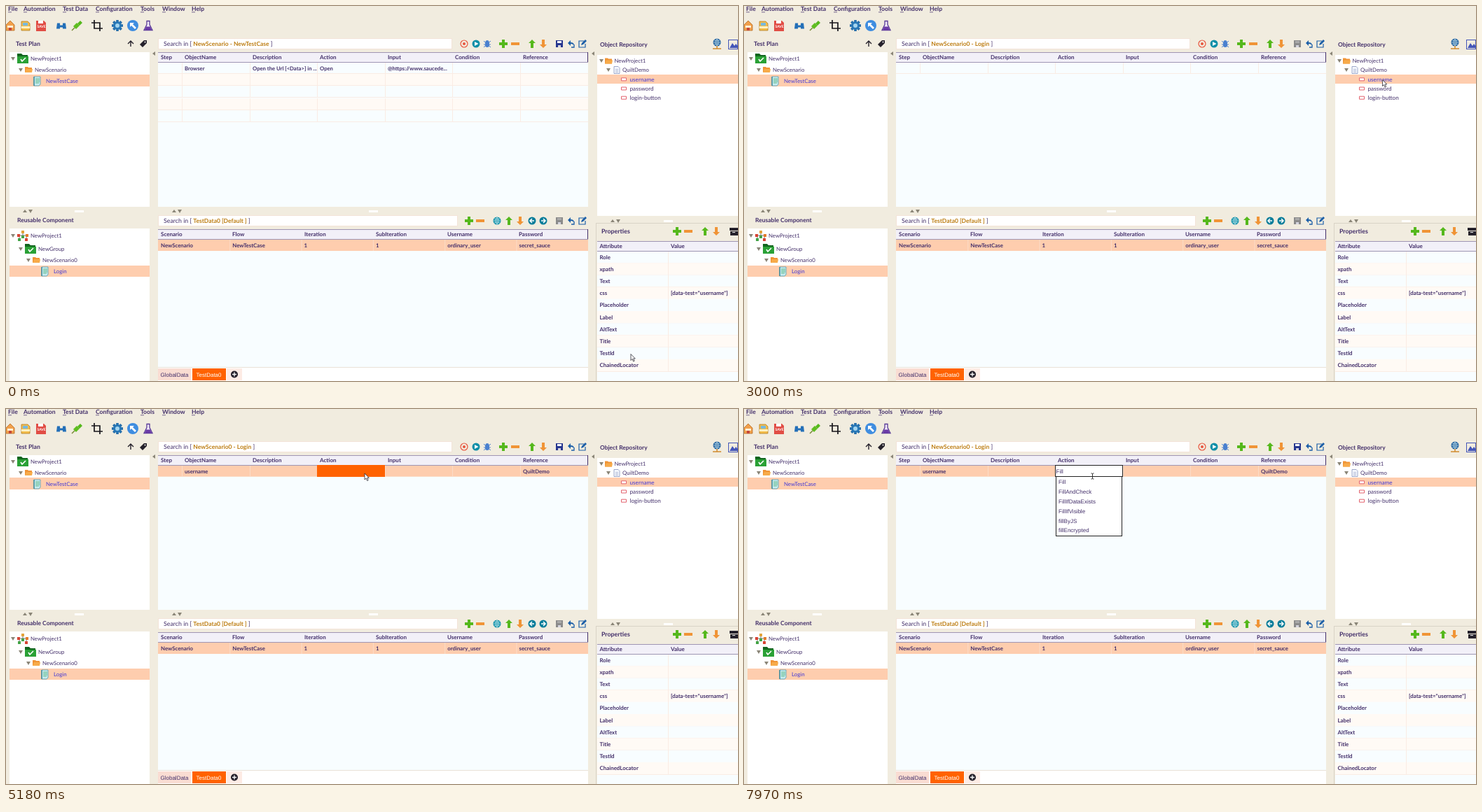
Recreate the animation shown at these times as an HTML page with a canvas. Size 1045 px wide and 536 px high, loop 8000 ms.

```html
<!DOCTYPE html>
<html lang="en">
<head>
<meta charset="utf-8">
<title>Test designer</title>
<style>
html, body { margin: 0; width: 100%; height: 100%; overflow: hidden; background: #f1ecdf; }
canvas { display: block; }
</style>
</head>
<body>
<canvas id="stage" width="1045" height="536"></canvas>
<script>
const c = document.getElementById('stage').getContext('2d');
const LOOP = 8000, INK = '#432f6a', LINK = '#4038d6', SEL = '#fecdae', SEL_GRID = '#fbdcc8', GRID = '#faece4',
  RULE = '#9f95b3', GREEN = '#55b81c', AMBER = '#f09436', BLUE = '#1c5fa8', TEAL = '#0e8fa8', GREY = '#8b8b8b', DARK = '#25212b';

// Drawing helpers
function box(x, y, w, h, color) { c.fillStyle = color; c.fillRect(x, y, w, h); }
function frame(x, y, w, h, color) { c.strokeStyle = color; c.lineWidth = 1; c.strokeRect(x + .5, y + .5, w - 1, h - 1); }
function disc(x, y, r, color) { c.fillStyle = color; c.beginPath(); c.arc(x, y, r, 0, 7); c.fill(); }
function shape(d, x, y, fill, stroke, width = 1) {
  const p = new Path2D(d);
  c.save();
  c.translate(x, y);
  if (fill) { c.fillStyle = fill; c.fill(p); }
  if (stroke) { c.strokeStyle = stroke; c.lineWidth = width; c.stroke(p); }
  c.restore();
}
// y is the middle of the capitals; returns the end of the text
function text(s, x, y, size = 7.8, color = INK, weight = 400, family = 'Lato') {
  c.font = `${weight} ${size}px ${family}, sans-serif`;
  c.fillStyle = color;
  c.fillText(s, x, y + size * .36);
  return x + c.measureText(s).width;
}
const bold = (s, x, y, size = 8, color = INK) => text(s, x, y, size, color, 700);
const plain = (s, x, y, color = INK) => text(s, x, y, 8, color, 400, '"Liberation Sans"');

// Icons, each centred on x, y
const icon = {
  plus: (x, y) => shape('M-2-6H2V-2H6V2H2V6H-2V2H-6V-2H-2Z', x, y, GREEN),
  minus: (x, y) => shape('M-6-2H6V2H-6Z', x, y, AMBER),
  up: (x, y) => shape('M0-6L5-1H2V6H-2V-1H-5Z', x, y, GREEN),
  down: (x, y) => shape('M0 6L5 1H2V-6H-2V1H-5Z', x, y, AMBER),
  save(x, y, color = '#26368f') {
    shape('M-5-5H5V5H-5Z', x, y, color);
    box(x - 3, y - 4, 6, 3, color === GREY ? '#aaa' : '#fff');
    box(x - 2, y + 2, 4, 3, '#d5d5df');
  },
  refresh(x, y) {
    shape('M-5-1L-1-5V-2Q4-2 4 2Q2 0-1 0V3Z', x, y, BLUE);
    shape('M0 5H4V1', x, y, null, BLUE, 1.3);
  },
  edit(x, y) {
    shape('M2-4H-5V5H4V0', x, y, null, BLUE, 1.2);
    shape('M-2 2L-1-1L4-6L6-4L1 1Z', x, y, BLUE);
  },
  globe(x, y, color = TEAL) {
    disc(x, y, 5.5, color);
    shape('M-5 0H5M0-5V5M-4-3Q0-1 4-3M-4 3Q0 1 4 3M0-5Q-5 0 0 5Q5 0 0-5', x, y, null, '#d9f1f4', .6);
  },
  record(x, y) {
    c.lineWidth = 1.2; c.strokeStyle = '#e8553e';
    c.beginPath(); c.arc(x, y, 5, 0, 7); c.stroke();
    disc(x, y, 2, '#e8553e');
  },
  play(x, y) { disc(x, y, 5.5, TEAL); shape('M-2-3L3.5 0L-2 3Z', x, y, '#fff'); },
  bug(x, y) {
    shape('M-5-4L5 5M5-4L-5 5M-5 1H5', x, y, null, '#4a80cf');
    shape('M-3 0Q-3-5 0-5T3 0V2Q3 5 0 5T-3 2Z', x, y, '#4a80cf');
  },
  go(x, y, dir) {
    disc(x, y, 5.5, '#087d9a');
    shape(`M${-3 * dir} 0H${3 * dir}M0-3L${3 * dir} 0L0 3`, x, y, null, '#fff', 1.5);
  },
  folder(x, y) { shape('M-5-4H-1L0-3H5V4H-5Z', x, y, AMBER); shape('M-5 4L-3-1H6L5 4Z', x, y, '#f7ab4a'); },
  group(x, y) {
    shape('M-8-7H-2L0-5H7V7H-8Z', x, y, '#12661f');
    shape('M-8-3H8V7H-8Z', x, y, '#2aa136');
    shape('M-3 1L-1 4L4-1', x, y, null, '#fff', 1.6);
  },
  sheet(x, y) {
    shape('M-5-6H4V5L2 7H-5Z', x, y, '#c8ebef', '#4d9db0', .8);
    shape('M-3-3H3M-3-1H3M-3 1H3M-3 3H2', x, y, null, '#4cae74', .8);
    shape('M-5-6V7', x, y, null, '#2d8294', 1.2);
  },
  page(x, y) { shape('M-4-5H2L4-3V5H-4Z', x, y, '#f5f8ff', '#8793bb', .8); shape('M-2-1H2M-2 1H2M-2 3H2', x, y, null, '#8793bb', .6); },
  field(x, y) { shape('M-3.5-2H3.5V2H-3.5Z', x, y, '#fff', '#e3636e'); },
  tri(x, y, color = '#8a8577') { shape('M-3-2H3L0 3Z', x, y, color); },
  triUp(x, y, color = '#8a8577') { shape('M-3 2H3L0-2Z', x, y, color); }
};
const icons = (y, list) => list.forEach(([name, x, arg]) => icon[name](x, y, arg));

function menu() {
  [['File', 3], ['Automation', 25], ['Test Data', 81], ['Configuration', 128], ['Tools', 192], ['Window', 223], ['Help', 265]]
    .forEach(([s, x]) => {
      bold(s, x, 4.2, 8.6);
      box(x, 8.5, 5, .7, INK);
    });
  shape('M-6-1L0-7L6-1V7H-6Z', 6, 28, '#f1a04c', '#b86c23', .8);
  shape('M-4 0H4V3H-4Z', 6, 28, '#fff1d5');
  box(4, 31, 4, 4, '#c5473a');
  shape('M-6-6H3L6-3V7H-6Z', 28, 28, '#f3bd4c', '#b17b22', .8);
  shape('M-4-4H3V0H-4Z', 28, 28, '#78b9dc');
  box(22, 29, 12, 3, '#fff0bf');
  shape('M-7-7H4L7-4V8H-7Z', 50, 28, '#e14d45');
  box(46, 21, 7, 4, '#fff');
  text('SAVE', 44.5, 29, 5, '#fff', 700);
  shape('M-6-4H-2V-1H2V-4H6L7 4H2V2H-2V4H-7Z', 79, 28.5, '#236fb8');
  shape('M-7 7L-3 3', 101, 28, null, '#7b8c3b', 1.6);
  shape('M-5 1L0-4L4 0L-1 5Z', 101, 28, '#5fbd20');
  shape('M1-3L5-7L8-4L4 0Z', 101, 28, GREEN);
  shape('M-4-8V4H8M-8-4H4V8', 130, 28, null, '#17151b', 1.7);
  for (let i = 0; i < 8; i++) {
    c.save(); c.translate(159, 28); c.rotate(i * Math.PI / 4); box(-1.8, -8, 3.6, 4, '#246ca9'); c.restore();
  }
  disc(159, 28, 6, '#2878b7');
  disc(159, 28, 3, '#a4d5ef');
  disc(181, 28, 8, '#3f8de0');
  shape('M-4-4H2L0-2L5 3L3 5L-2 0L-4 2Z', 181, 28, '#fff');
  shape('M-2-7H2V-2L6 6H-6L-2-2Z', 203, 28.5, '#f1e9f8', '#593b96', 1.3);
  shape('M-3 1H3L5 6H-5Z', 203, 28.5, '#6b3ba7');
}

function splitters() {
  [[27, 293, 98], [240, 293, 518], [866, 307, 939]].forEach(([x, y, grip]) => {
    icon.triUp(x, y); icon.tri(x + 8, y);
    box(grip, y - 1, 13, 3, '#fff');
  });
  [211, 838].forEach(x => shape('M2-3V3L-2 0Z', x, 68, '#8a8577'));
}

function trees() {
  bold('Test Plan', 14, 54, 8.7);
  shape('M0 4V-4M-4 0L0-4L4 0', 178, 54, null, DARK, 1.4);
  shape('M-5 1L1-5H5V-1L-1 5Z', 196, 54, DARK);
  disc(198.5, 51.5, 1, '#fff');
  box(5, 66, 200, 221, '#fff');
  box(5, 98, 200, 17, SEL);
  icon.tri(10, 75); icon.group(24, 75); text('NewProject1', 35, 75);
  icon.tri(21, 91); icon.folder(32, 91); text('NewScenario', 41, 91);
  icon.sheet(45, 107); text('NewTestCase', 57, 107, 7.8, LINK);

  bold('Reusable Component', 16, 306, 8.5);
  box(5, 318, 200, 218, '#fff');
  box(5, 371, 200, 16, SEL);
  icon.tri(10, 328);
  shape('M0-4V0M-5 4V0H5V4', 24, 328, null, '#777', 1);
  [[22, 321, '#e3a33a'], [16, 326, '#d84434'], [22, 328, '#43a447'], [28, 326, '#e37c2c'], [17, 332, '#43a447'], [27, 332, '#d84434']]
    .forEach(([x, y, color]) => box(x, y, 4, 4, color));
  text('NewProject1', 35, 328);
  icon.tri(21, 347); icon.group(35, 347); text('NewGroup', 46, 347);
  icon.tri(32, 363); icon.folder(43, 363); text('NewScenario0', 52, 363);
  icon.sheet(56, 379); text('Login', 68, 379, 7.9, LINK);

  bold('Object Repository', 848, 55, 8.4);
  icon.globe(1015, 52, '#1f5f9e');
  shape('M-6 9H6M0 5V9', 1015, 52, null, '#d18b2e', 1.5);
  frame(1031, 48, 14, 14, '#4355b8');
  shape('M1033 60L1037 53L1040 57L1042 54L1045 58V60Z', 0, 0, '#4355b8');
  box(844, 70, 201, 230, '#fff');
  box(844, 98, 201, 13, SEL);
  icon.tri(850, 78); icon.folder(860, 78.5); text('NewProject1', 868.5, 78.5);
  icon.tri(860, 91); icon.page(872, 91.5); text('QuiltDemo', 880, 91.5);
  ['username', 'password', 'login-button'].forEach((s, i) => {
    const y = 104.8 + i * 13.2;
    icon.field(882, y);
    text(s, 890.5, y, 8.2, i ? INK : LINK);
  });
}

function search(y, w, name) {
  box(217, y - 8, w, 16, '#fff');
  frame(217, y - 8, w, 16, '#f3e3d8');
  let x = text('Search in [ ', 225, y, 8.8);
  x = bold(name, x, y, 8.5, '#bd7d12');
  text(' ]', x, y, 8.8);
}

function header(y, h, cols) {
  box(217, y, 614, h, '#f2f0f8');
  box(217, y, 614, 1, RULE);
  box(217, y + h, 614, 1, RULE);
  box(830, y, 1, h, INK);
  cols.forEach(([s, x]) => bold(s, x, y + h / 2 + .3));
}

function dataPanel() {
  search(307, 428, 'TestData0 [Default ]');
  icons(307, [['plus', 661], ['minus', 677], ['globe', 701], ['up', 718], ['down', 734], ['go', 751, -1], ['go', 767, 1],
    ['save', 790, GREY], ['refresh', 807], ['edit', 823]]);
  box(217, 319, 614, 197, '#f8fdff');
  box(217, 334, 614, 16, SEL);
  ['NewScenario', 'NewTestCase', '1', '1', 'ordinary_user', 'secret_sauce'].forEach((s, i) => {
    if (i) box(217 + i * 102.3, 334, 1, 16, SEL_GRID);
    bold(s, 221 + i * 102.3, 342, 7.8);
  });
  header(319, 14, [['Scenario', 221], ['Flow', 323], ['Iteration', 426], ['SubIteration', 528], ['Username', 630], ['Password', 732]]);
  box(217, 516, 614, 20, '#fff');
  box(217, 516, 614, 1, '#e9e2d7');
  box(217, 518, 47, 17, '#f9dcd2');
  plain('GlobalData', 220.5, 527);
  box(266, 518, 48, 17, '#ff6200');
  plain('TestData0', 271.5, 527, '#fff');
  box(315, 518, 22, 17, '#fdebe4');
  disc(326, 526.5, 5, DARK);
  shape('M-3 0H3M0-3V3', 326, 526.5, null, '#fff', 1.3);
}

function properties() {
  box(842, 310, 203, 1, '#d9d3c6');
  box(842, 310, 1, 226, '#d9d3c6');
  bold('Properties', 850, 322, 8.8);
  icons(322, [['plus', 958], ['minus', 974], ['up', 998], ['down', 1014]]);
  box(1033, 317, 12, 4, DARK); box(1034, 322, 11, 6, DARK); box(1037, 323, 4, 1, '#fff');
  box(844, 336, 201, 200, '#f8fdff');
  box(844, 336, 201, 14, '#f2f0f8');
  box(844, 336, 201, 1, RULE);
  bold('Attribute', 847.5, 343); bold('Value', 949, 343);
  ['Role', 'xpath', 'Text', 'css', 'Placeholder', 'Label', 'AltText', 'Title', 'TestId', 'ChainedLocator'].forEach((s, i) => {
    const y = 350 + i * 17.2;
    box(844, y, 201, 17.2, i % 2 ? '#fffaf5' : '#f8fdff');
    box(844, Math.round(y + 17), 201, 1, GRID);
    bold(s, 847.5, y + 8.7, 7.9);
  });
  box(844, 350, 201, 1, RULE);
  box(945, 351, 1, 171, GRID);
  bold('[data-test="username"]', 949, 410.3, 7.9);
}

const COLS = ['Step', 'ObjectName', 'Description', 'Action', 'Input', 'Condition', 'Reference'];
const colX = i => i ? 251 + Math.round((i - 1) * 96.6) : 217;

function steps(t) {
  const login = t >= 1870, dropped = t >= 4470, editing = t >= 5380;
  const selected = t >= 5180 || (t >= 3430 && !dropped);
  search(54, 420, login ? 'NewScenario0 - Login' : 'NewScenario - NewTestCase');
  icons(54, [['record', 654], ['play', 671], ['bug', 687], ['plus', 710], ['minus', 727], ['up', 751], ['down', 767],
    ['save', 790, login && !dropped ? GREY : undefined], ['refresh', 807], ['edit', 823]]);
  box(217, 66, 614, 221, '#f8fdff');
  const rows = login ? 1 : 5, line = selected ? SEL_GRID : GRID;
  for (let r = 0; r < rows; r++) {
    const y = 80 + Math.round(r * 17.2);
    box(217, y, 614, 17, selected ? SEL : r % 2 ? '#fffaf5' : '#f8fdff');
    box(217, y + 16, 614, 1, line);
    for (let i = 1; i < 7; i++) box(colX(i), y, 1, 17, line);
  }
  header(66, 14, COLS.map((s, i) => [s, colX(i) + 4]));
  const cells = !login ? ['', 'Browser', 'Open the Url [<Data>] in ...', 'Open', '@https://www.saucede...']
    : dropped ? ['', 'username', '', '', '', '', 'QuiltDemo'] : [];
  cells.forEach((s, i) => bold(s, colX(i) + 4, 89, 7.7));
  if (editing) editor(t);
  else if (t >= 5180) box(444, 80, 97, 17, '#ff6200');
  else if (dropped) shape('M.5 17V.5H97.5V17', 444, 80, null, '#dc4a4a');
}

// Typed text and the matching actions, by start time
const TYPED = [
  [7100, 'Fill', 'Fill FillAndCheck FillIfDataExists FillIfVisible fillByJS fillEncrypted'],
  [6950, 'Fil'],
  [6670, 'Fi', 'FillAndCheck FillIfDataExists FillIfVisible RemoveInputFile SetInputFile SetInputFiles fillByJS fillEncrypted'],
  [6420, 'F', 'Fill FillAndCheck FillIfDataExists FillIfVisible Focus RemoveInputFile SetInputFile SetInputFiles'],
  [5380, '', 'Blur Check Clear Click Fill FillAndCheck FillIfDataExists FillIfVisible']
];

function editor(t) {
  box(444, 80, 97, 17, '#fff');
  frame(444, 80, 97, 17, '#222');
  const now = TYPED.findIndex(([start]) => t >= start);
  const end = plain(TYPED[now][1], 445.5, 89.5);
  const hidden = t >= 7630 || (t >= 5970 && t < 6420);
  if (!hidden) box(Math.floor(end), 83, 1, 11, '#222');

  const items = TYPED.slice(now).find(e => e[2])[2].split(' ');
  const long = items.length > 6, h = long ? 113 : 86;
  box(445, 96, 95, h, '#fff');
  frame(445, 96, 95, h, '#222');
  items.forEach((s, i) => plain(s, 449, (long ? 106 : 104.5) + i * 13.8));
  if (long) {
    box(529, 97, 10, 111, '#f8f8f8');
    icon.triUp(534, 103, '#555'); icon.tri(534, 202, '#555');
    shape('M529.5 108V125Q538 126 538 133V188Q538 195 529.5 197', 0, 0, '#fff', '#999', .9);
    box(530, 108, 5, 3, '#8d8d8d');
  }
}

// Pointer moves: first step, last step, number of steps, x, y
const MOVES = [
  [70, 150, 2, 158, 425], [290, 510, 3, 78, 383], [720, 790, 2, 78.5, 381], [2180, 2180, 1, 388, 251],
  [2380, 2380, 1, 727, 185], [2520, 2840, 5, 912, 107], [3000, 3000, 1, 911.5, 105.5], [3340, 3520, 3, 487, 93.5],
  [3830, 3940, 2, 362, 86], [4080, 4080, 1, 312, 86], [4290, 4290, 1, 310, 86.5], [4550, 5040, 7, 512, 92],
  [7970, 7970, 1, 497.5, 96]
];
const PRESSED = [[1570, 1970], [3250, 4550], [5280, 5620]];
const within = (t, a, b) => t >= a && t < b;

function pointerAt(t) {
  let x = 892, y = 497.5;
  for (const [a, b, n, toX, toY] of MOVES) {
    if (t < a) break;
    const step = n === 1 ? 1 : Math.min(n, 1 + Math.floor((t - a) / (b - a) * (n - 1) + 1e-6));
    const left = (1 - step / n) ** 2;
    x = toX + (x - toX) * left;
    y = toY + (y - toY) * left;
  }
  return [x, y];
}

function pointer(t) {
  const [x, y] = pointerAt(t);
  if (PRESSED.some(([a, b]) => within(t, a, b))) disc(x - .7, y + .5, 8.3, 'rgba(253,230,45,.68)');
  if (t >= 5380) {
    shape('M-2-4H-.5L0-3.5L.5-4H2M0-3.5V3.5M-2 4H-.5L0 3.5L.5 4H2', x, y, null, '#222', .9);
    return;
  }
  shape('M0 0V9L2 7L3.6 10.5L5.2 9.8L3.6 6.5H6.3Z', x, y, '#fff', '#2b2b35', .8);
  if (within(t, 3340, 4470)) shape('M2 9H8V13.5H2Z', x, y, '#fff', '#333', .9);
}

function draw(t) {
  box(0, 0, 1045, 536, '#f1ecdf');
  menu();
  splitters();
  trees();
  steps(t);
  dataPanel();
  properties();
  pointer(t);
}

c.textRendering = 'geometricPrecision';
const began = performance.now();
function tick() {
  draw((performance.now() - began) % LOOP);
  requestAnimationFrame(tick);
}
tick();
</script>
</body>
</html>
```
